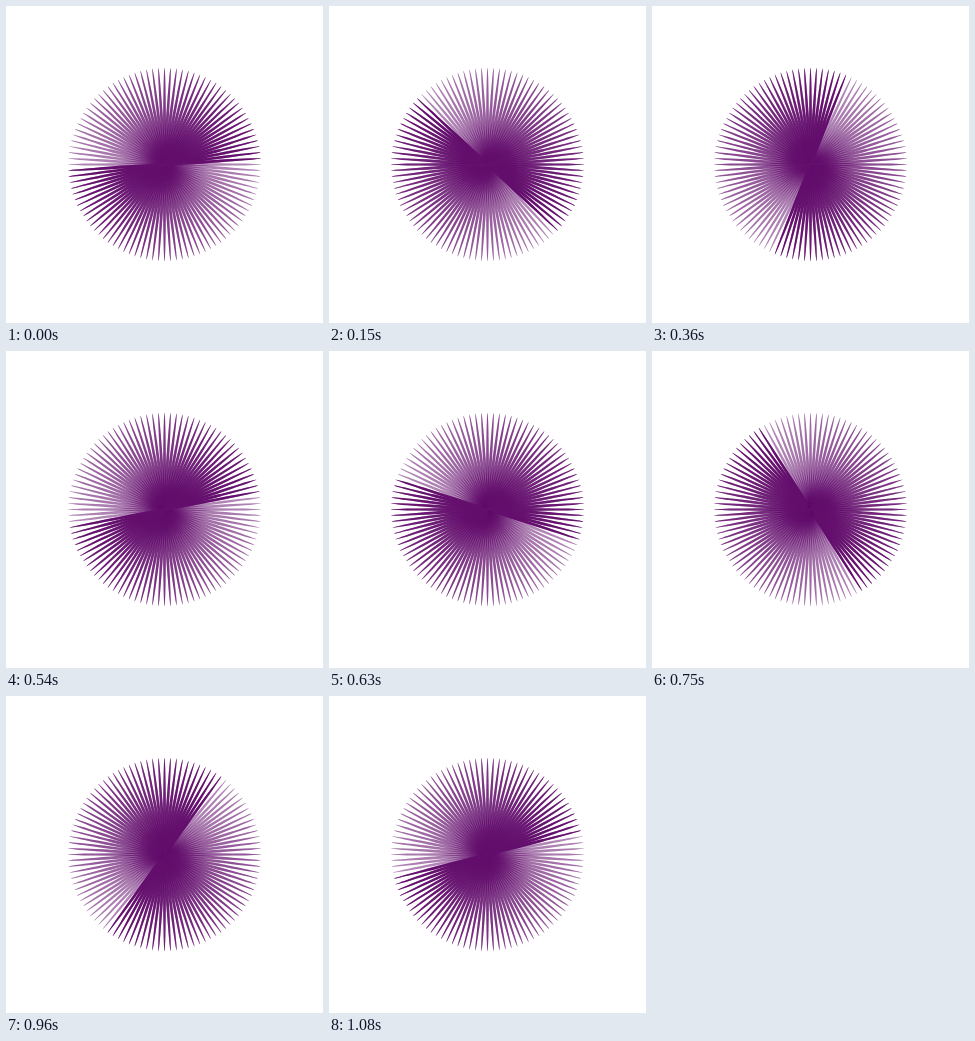
These frames come from a looping animation (317 by 317 pixels, 1.11 s). An HTML page with a canvas:

```html
<!DOCTYPE html>
<html lang="en">
<head>
<meta charset="utf-8">
<title>Spinner</title>
<style>
  html, body { margin: 0; width: 100%; height: 100%; overflow: hidden; background: #fff; }
  canvas { display: block; }
</style>
</head>
<body>
<canvas id="stage" width="317" height="317"></canvas>
<script>
const LOOP = 1110, STEP = 30, COUNT = 100;
const CENTER = 158.5, UNIT = 3.17;
const ctx = document.getElementById('stage').getContext('2d');
ctx.fillStyle = '#640f6d';

// Each needle spans the full diameter and fades from opaque to clear over one loop.
function draw(time) {
  ctx.globalAlpha = 1;
  ctx.clearRect(0, 0, 317, 317);
  for (let i = 0; i < COUNT; i++) {
    const phase = (time / LOOP - (i + 1) / COUNT + 1) % 1;
    ctx.globalAlpha = 1 - phase;
    ctx.beginPath();
    ctx.ellipse(CENTER, CENTER, 30.5 * UNIT, UNIT / 2, i / COUNT * 2 * Math.PI, 0, 2 * Math.PI);
    ctx.fill();
  }
}

const start = performance.now();
function tick() {
  const time = (performance.now() - start) % LOOP;
  draw(Math.floor(time / STEP) * STEP);
  requestAnimationFrame(tick);
}
tick();
</script>
</body>
</html>
```
